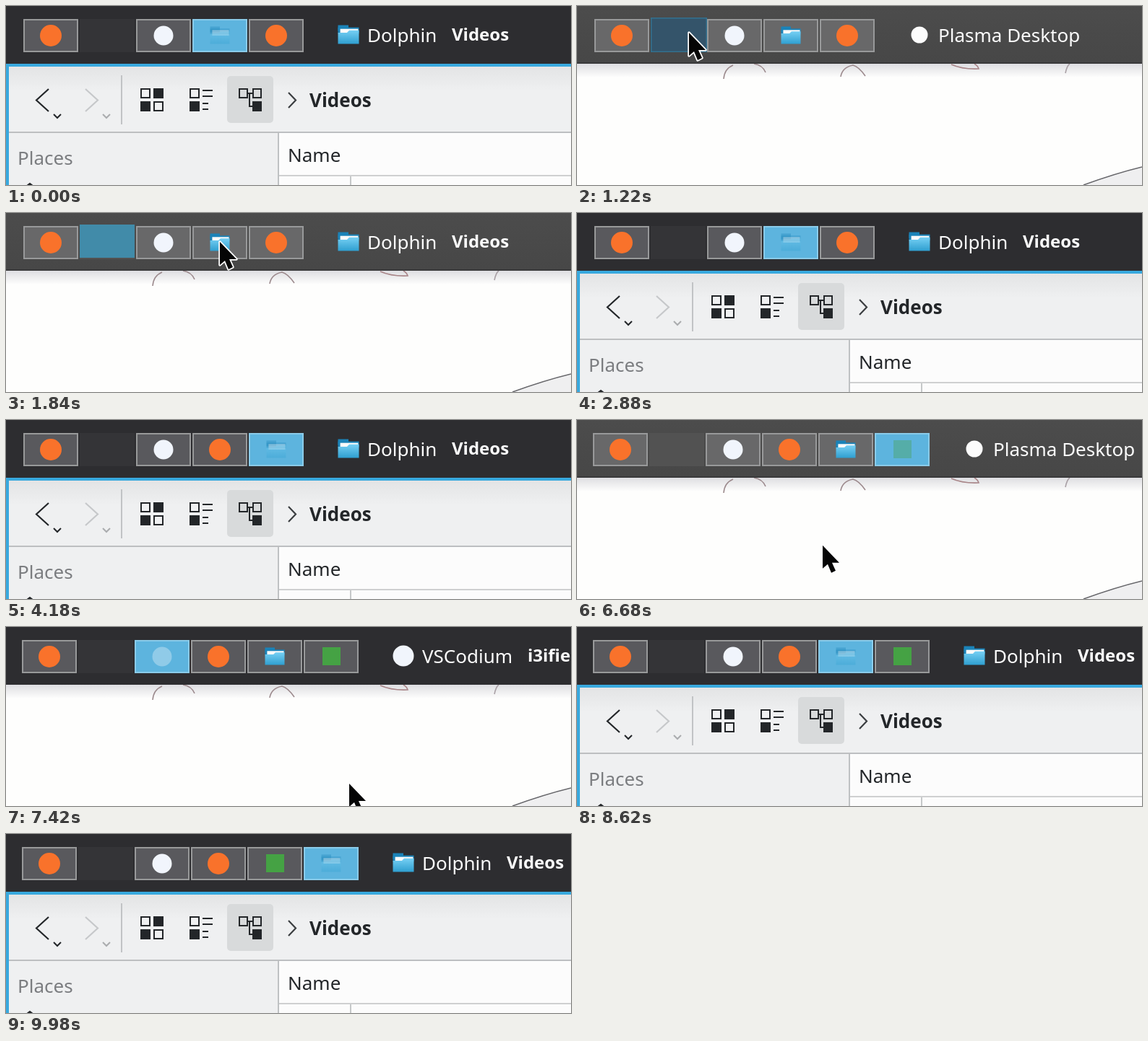
These frames come from a looping animation (782x248 px, 10000 ms). An HTML page with a canvas:

```html
<!DOCTYPE html>
<html lang="en">
<head>
<meta charset="utf-8">
<title>Desktop switcher</title>
<style>
  html, body { margin: 0; width: 100%; height: 100%; overflow: hidden; background: #fff; }
  canvas { display: block; }
</style>
</head>
<body>
<canvas id="stage" width="782" height="248"></canvas>
<script>
const ctx = document.getElementById('stage').getContext('2d');
const LOOP = 10000, INK = '#232629', FONT = '"Noto Sans", sans-serif';
const ADD_AT = 4900, LAUNCH_AT = 5900, SWAP_1 = 3300, SWAP_2 = 9330;

// Which desktop is shown from which time on
const visits = [[0, 'files'], [1110, 'empty'], [1840, 'files'],
                [ADD_AT, 'extra'], [7160, 'code'], [8360, 'files']];

// Pointer stops: time, x, y
const pointer = [
  [20, 330, 260], [760, 170, 60], [1000, 155, 37], [1320, 155, 37], [1760, 296, 40], [2060, 296, 40], [2460, 330, 290],
  [2900, 340, 260], [3150, 290, 40], [3300, 296, 40], [3560, 374, 40], [3800, 374, 40], [4220, 420, 290],
  [4440, 480, 270], [4800, 450, 40], [5000, 450, 40], [5420, 480, 290],
  [6480, 420, 260], [6950, 216, 40], [7180, 216, 40], [7420, 475, 217], [7480, 510, 275],
  [7760, 400, 260], [8200, 372, 40], [8380, 372, 40], [8600, 380, 270],
  [8800, 390, 260], [9150, 374, 40], [9330, 374, 40], [9600, 450, 40], [9720, 450, 40], [9960, 470, 290]
];

const ramp = (t, from, length) => {
  const u = Math.min(1, Math.max(0, (t - from) / length));
  return u * u * (3 - 2 * u);
};
const lerp = (a, b, u) => a + (b - a) * u;

function rect(x, y, w, h, color) {
  ctx.fillStyle = color;
  ctx.fillRect(x, y, w, h);
}
function box(x, y, w, h, color, width = 2) {
  ctx.strokeStyle = color;
  ctx.lineWidth = width;
  ctx.strokeRect(x + width / 2, y + width / 2, w - width, h - width);
}
function disc(x, y, r, color) {
  ctx.fillStyle = color;
  ctx.beginPath();
  ctx.arc(x, y, r, 0, 7);
  ctx.fill();
}
function line(path, color, width = 2) {
  ctx.strokeStyle = color;
  ctx.lineWidth = width;
  ctx.stroke(new Path2D(path));
}
function text(str, x, y, color, size = 26, weight = 400) {
  ctx.font = `${weight} ${size}px ${FONT}`;
  ctx.fillStyle = color;
  ctx.fillText(str, x, y);
}
function shade(y, h, top, bottom) {
  const g = ctx.createLinearGradient(0, y, 0, y + h);
  g.addColorStop(0, top);
  g.addColorStop(1, bottom);
  return g;
}
function faded(alpha, draw) {
  if (alpha <= 0) return;
  ctx.save();
  ctx.globalAlpha *= alpha;
  draw();
  ctx.restore();
}

function folder(x, y, size) {
  ctx.save();
  ctx.translate(x, y);
  ctx.scale(size / 28, size / 28);
  rect(-14, -13, 14, 8, '#1b83b8');
  rect(-14, -10, 28, 8, '#1b83b8');
  rect(-11, -8, 24, 8, '#fafafa');
  ctx.fillStyle = shade(-5, 17, '#72cdf2', '#2f9fd0');
  ctx.fill(new Path2D('M-14-3H-2L1-6H14V12H-14Z'));
  ctx.restore();
}

const icons = {
  web: (x, y) => disc(x, y, 15, '#f9722b'),
  code: (x, y, size = 27) => disc(x, y, size / 2, '#f1f5fc'),
  files: (x, y, size = 27) => folder(x, y, size),
  design: (x, y) => rect(x - 12, y - 13, 25, 25, '#45a244'),
  plasma: (x, y) => disc(x, y, 11.5, '#fcfcfc')
};

function drawWallpaper() {
  rect(0, 79, 782, 169, '#fefefd');
  rect(0, 79, 782, 20, shade(79, 20, '#dcdce0', '#fefefd'));
  line('M203 101Q204 87 216 82M245 80Q257 82 261 92', '#9c8a8d', 1.6);
  line('M365 98Q367 85 382 82Q390 84 399 97', '#9c8a8d', 1.6);
  line('M518 81Q534 88 556 87Q555 83 550 80', '#a98689', 1.6);
  line('M676 93Q678 83 682 80', '#a9a0a5', 1.6);
  ctx.fillStyle = '#efeff0';
  ctx.fill(new Path2D('M701 248Q745 232 782 223V248Z'));
  line('M701 248Q745 232 782 223', '#66666a', 1.5);
}

function drawFileManager() {
  rect(0, 80, 782, 168, '#38a9de');
  rect(4, 84, 778, 90, shade(84, 34, '#e3e4e5', '#eff0f1'));
  rect(4, 174, 778, 2, '#bdbfc1');
  rect(4, 176, 373, 72, '#eff0f1');
  rect(377, 176, 405, 72, '#fcfcfc');
  rect(376, 176, 2, 72, '#bfc1c3');
  rect(378, 234, 404, 2, '#cfd0d1');
  rect(476, 236, 2, 12, '#c6c8c9');

  line('M59 115L42 130.5L59 146', INK, 2.2);
  line('M66 150L71 155L76 150', INK);
  line('M110 115L127 130.5L110 146', '#c6c8ca', 2.2);
  line('M134 150L139 155L144 150', '#aaacae');
  rect(159, 96, 2, 68, '#c1c3c5');

  box(186, 114, 14, 14, INK);
  rect(204, 114, 14, 14, INK);
  rect(186, 132, 14, 14, INK);
  box(204, 132, 14, 14, INK);

  box(254, 114, 14, 14, INK);
  rect(254, 132, 14, 14, INK);
  for (const [y, w] of [[116, 14], [124, 14], [134, 8], [142, 8]]) rect(272, y, w, 2, INK);

  ctx.fillStyle = '#d8dadb';
  ctx.beginPath();
  ctx.roundRect(306, 97, 64, 65, 5);
  ctx.fill();
  box(322, 114, 13, 14, INK);
  box(341, 114, 13, 14, INK);
  rect(341, 132, 13, 14, INK);
  line('M335 121H341M337 121V139H341', INK);

  line('M391 120L401 130.5L391 141', '#3b3e41', 2.2);
  text('Videos', 420, 140, INK, 26, 700);
  text('Places', 16, 220, '#7b7d80');
  text('Name', 390, 216, INK);
  line('M29 249L33 246L37 249', INK);
}

function drawBar(dark) {
  rect(0, 0, 782, 80, shade(0, 80, '#4c4c4c', '#474747'));
  rect(0, 78, 782, 2, '#3a3a3b');
  faded(dark, () => rect(0, 0, 782, 80, '#2d2d30'));
}

function drawSlot(x, app, dark, active, hovered) {
  const hasIcon = app in icons, y = 18, w = 76, h = 46;
  if (hasIcon) {
    rect(x, y, w, h, '#686869');
    faded(dark, () => rect(x, y, w, h, '#59595d'));
    box(x, y, w, h, '#98999a');
  } else {
    rect(x, y, w, h, '#525252');
    faded(dark, () => rect(x, y, w, h, '#343437'));
    if (hovered) {
      rect(x, y - 2, w + 2, h + 2, '#34546a');
      box(x, y - 2, w + 2, h + 2, '#33718f', 1.5);
    }
  }
  faded(active, () => {
    if (!hasIcon) return rect(x, y - 2, w, h, '#418ba9');
    rect(x, y, w, h, '#5db4de');
    box(x, y, w, h, '#8acbe9');
  });
  if (hasIcon) faded(1 - 0.65 * active, () => icons[app](x + 38, 41));
}

function drawTitle(current, x) {
  const titles = { files: ['Dolphin', 'Videos', 117], code: ['VSCodium', 'i3ifie', 146] };
  const [name, detail, offset] = titles[current] || ['Plasma Desktop'];
  icons[titles[current] ? current : 'plasma'](x - 26, 40, 29);
  text(name, x, 50, '#fcfcfc');
  if (detail) text(detail, x + offset, 48, '#fcfcfc', 24, 700);
}

function pointerAt(t) {
  const i = pointer.findIndex(stop => stop[0] > t);
  if (i < 1) return [0, 400];
  const [t0, x0, y0] = pointer[i - 1], [t1, x1, y1] = pointer[i];
  const u = ramp(t, t0, t1 - t0);
  return [lerp(x0, x1, u), lerp(y0, y1, u)];
}

function drawPointer(x, y) {
  ctx.save();
  ctx.translate(x, y);
  const arrow = new Path2D('M0 0V32L7 26L12 38L18 35L13 24H23Z');
  ctx.lineJoin = 'round';
  ctx.lineWidth = 3.5;
  ctx.strokeStyle = '#fff';
  ctx.stroke(arrow);
  ctx.fillStyle = '#050505';
  ctx.fill(arrow);
  ctx.restore();
}

function render(t) {
  const index = visits.findLastIndex(visit => visit[0] <= t);
  const [since, current] = visits[index];
  const previous = index ? visits[index - 1][1] : current;
  const blend = ramp(t, since, 100);
  const level = test => lerp(+test(previous), +test(current), blend);
  const dark = level(app => app === 'files' || app === 'code');

  const six = t >= ADD_AT, left = six ? 22 : 24;
  const swap1 = ramp(t, SWAP_1, 240), swap2 = ramp(t, SWAP_2, 240);
  const [px, py] = pointerAt(t);

  drawWallpaper();
  faded(level(app => app === 'files'), drawFileManager);
  drawBar(dark);

  // Slot positions; the dragged one comes last so that it stays on top
  const slots = [['web', 0], ['empty', 1], ['code', 2], ['web', 4 - swap1]];
  if (six) slots.push(['extra', 5 - swap2]);
  slots.push(['files', 3 + swap1 + swap2]);

  for (const [id, place] of slots) {
    const x = left + 78 * place;
    const app = id === 'extra' && t >= LAUNCH_AT ? 'design' : id;
    const isEmpty = !(app in icons);
    const active = id === current ? (index ? ramp(t, since + (isEmpty ? 130 : 0), isEmpty ? 240 : 150) : 1)
                 : id === previous ? 1 - blend : 0;
    const hovered = px >= x && px < x + 78 && py > 10 && py < 66;
    drawSlot(x, app, dark, active, hovered);
  }

  drawTitle(current, six ? 576 : 500);
  drawPointer(px, py);
}

const start = performance.now();
function tick() {
  render((performance.now() - start) % LOOP);
  requestAnimationFrame(tick);
}
tick();
</script>
</body>
</html>
```
